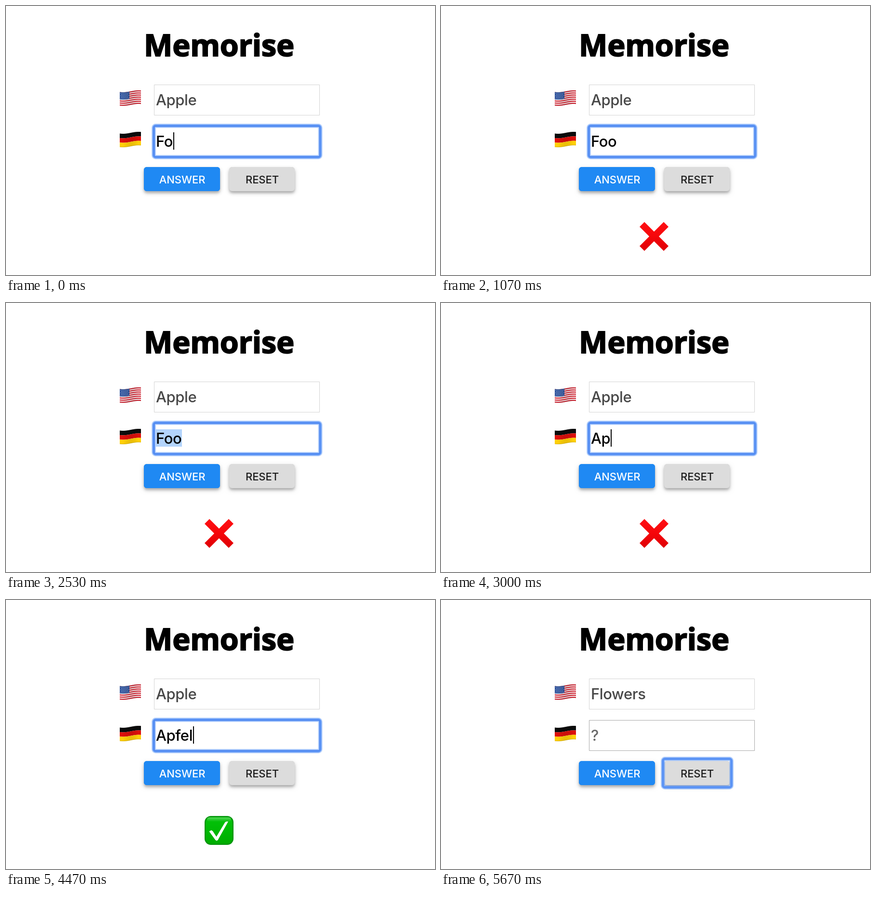
Write an HTML page with a canvas that moves like this. It is 890x558 px and loops after 5.74 s.

```html
<!DOCTYPE html>
<html lang="en">
<head>
<meta charset="utf-8">
<title>Memorise</title>
<style>
  html, body { margin: 0; width: 100%; height: 100%; overflow: hidden; background: #fff; }
  canvas, svg { position: absolute; left: 0; top: 0; width: 890px; height: 558px; }
  text { font-family: Inter, Roboto, sans-serif; font-weight: 450; }
  .title {
    font: 700 63px "Noto Sans", "Open Sans", sans-serif;
    letter-spacing: -0.25px;
    stroke: #000;
    stroke-width: 2px;
  }
  .word { font-size: 31px; letter-spacing: -0.4px; }
  .label { font-size: 22px; letter-spacing: -0.05px; text-anchor: middle; }
</style>
</head>
<body>
<canvas id="stage" width="890" height="558"></canvas>
<svg viewBox="0 0 890 558">
  <text class="title" x="286" y="103.5">Memorise</text>
  <text class="word" id="question" x="311" y="206" fill="#484848"></text>
  <text class="word" id="answer" x="311" y="292"></text>
  <text class="label" x="365.5" y="368" fill="#fff">ANSWER</text>
  <text class="label" x="531.5" y="368" fill="#1c1c1c">RESET</text>
</svg>
<script>
const LOOP = 5740;
const BLINK = 500;
const TEXT_X = 311;
const ctx = document.getElementById('stage').getContext('2d');
const question = document.getElementById('question');
const answer = document.getElementById('answer');

// Each step changes part of the form state; "key" marks a keystroke.
const steps = [
  { at: 0, question: 'Apple', answer: 'Fo', mark: '', focus: 'input', selected: false, key: true },
  { at: 130, answer: 'Foo', key: true },
  { at: 470, mark: 'cross' },
  { at: 1800, selected: true },
  { at: 2730, answer: 'A', selected: false, key: true },
  { at: 2900, answer: 'Ap', key: true },
  { at: 3130, answer: 'Apf', key: true },
  { at: 3270, answer: 'Apfe', key: true },
  { at: 3400, answer: 'Apfel', key: true },
  { at: 4330, mark: 'check' },
  { at: 4930, focus: 'reset' },
  { at: 5270, question: 'Flowers', answer: '', mark: '' }
];

function stateAt(t) {
  const s = {};
  for (const step of steps) {
    if (step.at > t) break;
    Object.assign(s, step);
    if (step.key) s.typed = step.at;
  }
  s.caret = s.focus === 'input' && !s.selected &&
    Math.floor((t - s.typed) / BLINK) % 2 === 0;
  return s;
}

function rect(color, x, y, w, h) {
  ctx.fillStyle = color;
  ctx.fillRect(x, y, w, h);
}

function fillRound(color, x, y, w, h, r) {
  ctx.fillStyle = color;
  ctx.beginPath();
  ctx.roundRect(x, y, w, h, r);
  ctx.fill();
}

function strokeRound(color, width, x, y, w, h, r) {
  ctx.strokeStyle = color;
  ctx.lineWidth = width;
  ctx.beginPath();
  ctx.roundRect(x, y, w, h, r);
  ctx.stroke();
}

function polygon(fill, points) {
  ctx.fillStyle = fill;
  ctx.beginPath();
  for (const [x, y] of points) ctx.lineTo(x, y);
  ctx.closePath();
  ctx.fill();
}

function vertical(y0, y1, ...colors) {
  const g = ctx.createLinearGradient(0, y0, 0, y1);
  colors.forEach((c, i) => g.addColorStop(i / (colors.length - 1), c));
  return g;
}

// Cloth hangs low near the pole and lifts towards the free end.
const phase = x => (x - 7) / 32 * Math.PI;
const wave = x => 2 * Math.cos(phase(x));

// A waving band of cloth, one pixel column at a time.
function band(color, x, y, from, to, top, bottom) {
  for (let i = from; i < to; i++) {
    rect(color, x + i, y + wave(i + 0.5) + top, 1, bottom - top);
  }
}

function shadeFlag(x, y) {
  for (let i = 0; i < 44; i++) {
    const alpha = 0.08 * Math.max(0, Math.sin(phase(i + 0.5)));
    rect(`rgba(0,0,0,${alpha})`, x + i, y + wave(i + 0.5), 1, 28);
  }
  band('rgba(0,0,0,0.15)', x, y, 0, 44, 0, 1);
  band('rgba(0,0,0,0.15)', x, y, 0, 44, 27, 28);
}

function americanFlag(x, y) {
  const h = 28 / 13;
  band('#f4eeee', x, y, 0, 44, 0, 28);
  for (let k = 0; k < 13; k += 2) band('#d42231', x, y, 0, 44, k * h, (k + 1) * h);
  band('#2d529c', x, y, 0, 20, 0, 7 * h);
  for (let r = 0; r < 5; r++) {
    for (let c = 0; c < 6 - r % 2; c++) {
      const sx = 1.5 + c * 3.1 + r % 2 * 1.5;
      rect('rgba(255,255,255,0.65)', x + sx, y + wave(sx) + 1.6 + r * 2.7, 1.2, 1.2);
    }
  }
  shadeFlag(x, y);
}

function germanFlag(x, y) {
  ['#0c0c0c', '#dd100c', '#ffd008'].forEach((c, i) =>
    band(c, x, y, 0, 44, i * 28 / 3, (i + 1) * 28 / 3));
  shadeFlag(x, y);
}

function button(color, x, y, w, h) {
  for (const [blur, alpha] of [[4, 0.18], [10, 0.2]]) {
    ctx.save();
    ctx.shadowColor = `rgba(0,0,0,${alpha})`;
    ctx.shadowOffsetY = 4;
    ctx.shadowBlur = blur;
    fillRound(color, x, y, w, h, 6);
    ctx.restore();
  }
}

function focusRing(x, y, w, h) {
  strokeRound('rgba(94,152,246,0.46)', 9, x, y, w, h, 4);
  strokeRound('#5c94f5', 5, x, y, w, h, 4);
}

function cross(cx, cy) {
  const a = 30, b = 20, c = a - b;
  polygon(vertical(cy - a, cy + a, '#ff1014', '#f5060a', '#de0006'), [
    [-a, -b], [-b, -a], [0, -c], [b, -a], [a, -b], [c, 0],
    [a, b], [b, a], [0, c], [-b, a], [-a, b], [-c, 0]
  ].map(([x, y]) => [cx + x, cy + y]));
}

function check(x, y) {
  fillRound('#08960e', x, y, 60, 60, 13);
  fillRound(vertical(y, y + 60, '#04c40a', '#00b904', '#00ac00'), x + 2.5, y + 2.5, 55, 55, 11);
  fillRound(vertical(y + 3, y + 12, 'rgba(255,255,255,0.3)', 'rgba(255,255,255,0)'),
    x + 5, y + 3, 50, 9, 7);
  polygon('#fff', [
    [9.5, 32], [14, 29.5], [17, 31.5], [24.5, 43], [42.5, 13], [45, 11.5], [49, 11.5],
    [27.5, 50], [25, 51.5], [22.5, 50]
  ].map(([px, py]) => [x + px, y + py]));
}

function draw(s) {
  rect('#fff', 0, 0, 890, 558);
  americanFlag(236, 177);
  germanFlag(236, 263);

  strokeRound('#d4d4d4', 1, 307.5, 163.5, 343, 63, 0);
  if (s.focus === 'input') {
    focusRing(306.5, 248.5, 345.5, 65);
    strokeRound('#4a83ec', 1, 307.5, 249.5, 343, 63, 0);
  } else {
    strokeRound('#aaaaaa', 1, 307.5, 249.5, 343, 63, 0);
  }

  button('#1f89f3', 286, 334, 158, 50);
  button('#dcdcdc', 463, 334, 136, 50);
  if (s.focus === 'reset') focusRing(460.5, 329.5, 142, 59);

  question.textContent = s.question;
  answer.textContent = s.answer || '?';
  answer.setAttribute('fill', s.answer ? '#000' : '#696969');

  const width = Math.round(answer.getComputedTextLength()) + 1;
  if (s.selected) rect('#b3d4fc', TEXT_X, 262, width, 36);
  if (s.caret) rect('#000', TEXT_X + width, 262, 2, 36);

  if (s.mark === 'cross') cross(442, 478);
  if (s.mark === 'check') check(412, 448);
}

const start = performance.now();
function frame() {
  draw(stateAt((performance.now() - start) % LOOP));
  requestAnimationFrame(frame);
}
frame();
</script>
</body>
</html>
```
